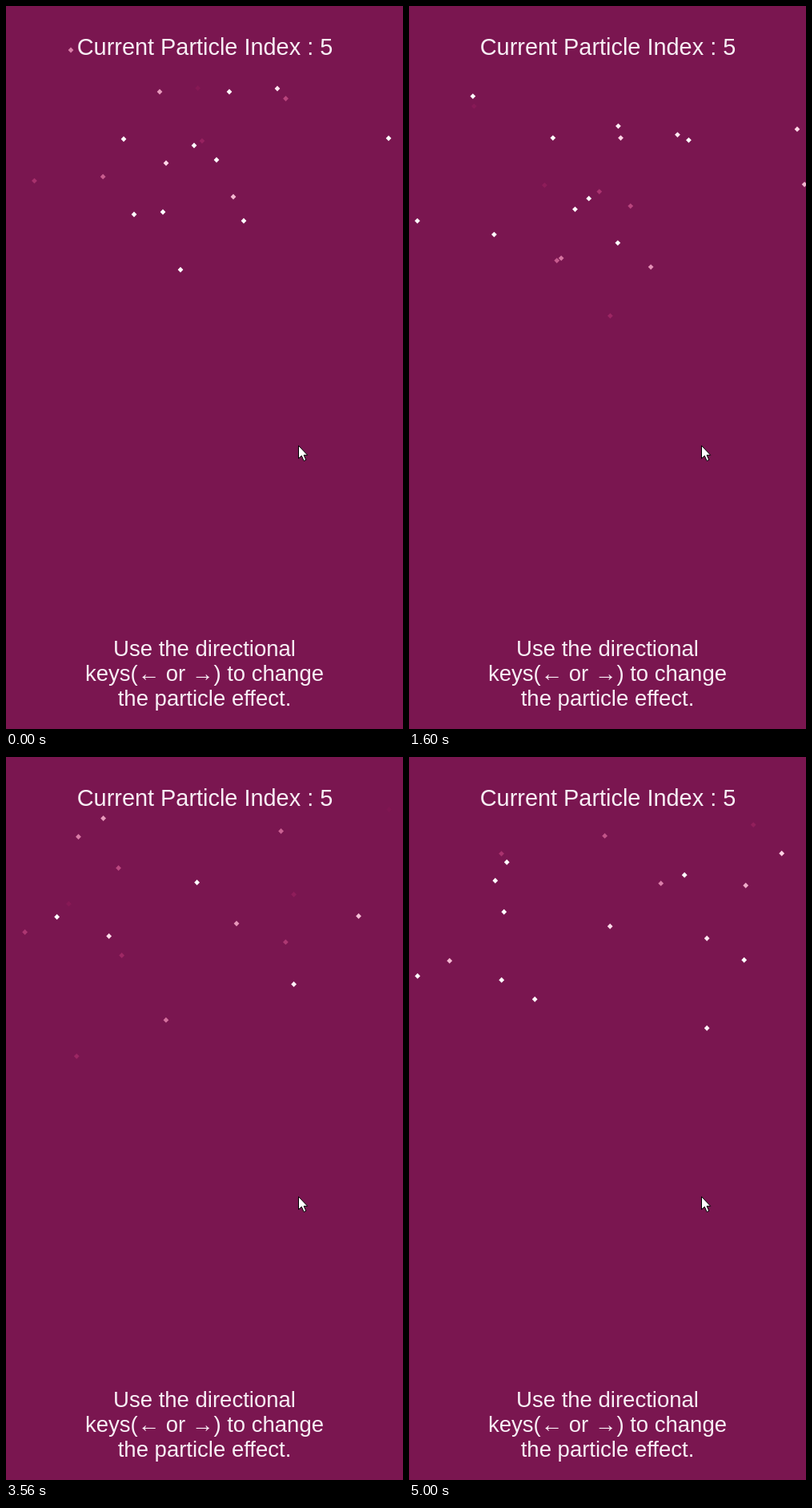
Recreate the animation shown at these times as an HTML page with a canvas. Size 496 px wide and 902 px high, loop 5040 ms.

```html
<!DOCTYPE html>
<html lang="en">
<head>
<meta charset="utf-8">
<title>Particle effect</title>
<style>
  html, body { margin: 0; width: 100%; height: 100%; overflow: hidden; background: #7a1650; }
  canvas, svg { position: absolute; left: 0; top: 0; display: block; }
  text { font-family: "Liberation Sans", Arial, sans-serif; fill: #f8eef5; text-anchor: middle; }
  .title { font-size: 28.9px; }
  .hint { font-size: 27.5px; }
  .arrow { font-family: "Liberation Serif", serif; }
</style>
</head>
<body>
<canvas id="sky" width="496" height="902"></canvas>
<svg width="496" height="902" viewBox="0 0 496 902">
  <text class="title" x="248.5" y="61">Current Particle Index : 5</text>
  <g class="hint">
    <text x="248" y="811">Use the directional</text>
    <text x="248" y="842">keys(<tspan class="arrow">←</tspan> or <tspan class="arrow">→</tspan>) to change</text>
    <text x="248" y="873">the particle effect.</text>
  </g>
  <path transform="translate(365.5 548.5)" fill="#fff" stroke="#000" stroke-linejoin="round"
    d="M0 0V16L3.8 12.6L6.6 19L9.3 17.8L6.6 11.8H11.2Z"/>
</svg>
<script>
const LOOP = 5040, STEP = 40;
const LIFE = 4.8, FADE_IN = 1.9, FADE_OUT = 1.7, RADIUS = 3.4;

const ctx = document.getElementById("sky").getContext("2d");
const wave = (i, period) => Math.sin(2 * Math.PI * i / period);

function seeded(seed) {
  return (lo, hi) => {
    seed = (seed * 1664525 + 1013904223) % 4294967296;
    return lo + (hi - lo) * seed / 4294967296;
  };
}

// Particles born at an even rate; key points are their places at time `at`
function flock(points, at, firstBorn, rate, fall, drift) {
  return points.map(([x, y], i) => (
    { x, y, at, born: firstBorn + i * rate, vx: drift(i), vy: fall }
  ));
}

// Particles that appear at random places
function strays(count, firstBorn, rate, rand) {
  return Array.from({ length: count }, (_, i) => {
    const born = firstBorn + i * rate;
    return {
      x: rand(20, 480), y: rand(15, 230), at: born, born,
      vx: rand(-18, 18), vy: rand(28, 48)
    };
  });
}

const opening = [
  [147, 166], [218, 329], [235, 174], [263, 192], [160, 260], [196, 257], [297, 268],
  [478, 165], [279, 107], [339, 103], [200, 196], [284, 238], [192, 107], [81, 55]
];
const closing = [
  [55, 236], [247, 193], [368, 320], [120, 260], [426, 235], [122, 113], [102, 136],
  [344, 129], [126, 175], [15, 255], [153, 284], [368, 208], [470, 102], [428, 142]
];

const rand = seeded(5);
const particles = [
  ...flock(opening, 0, -3, 0.146, 36, i => 14 - 1.8 * i + 10 * wave(i, 3)),
  ...strays(6, -0.9, 0.19, rand),
  ...flock(closing, 4.52, 1.45, 0.17, 38, i => 14 * wave(i - 0.375, 4.5) - 2),
  ...strays(4, 3.9, 0.28, rand)
];

function diamond(x, y, glow) {
  const g = Math.round(45 + 210 * glow);
  const b = Math.round(102 + 0.6 * g);
  ctx.globalAlpha = Math.min(1, 1.25 * glow);
  ctx.fillStyle = `rgb(255, ${g}, ${b})`;
  ctx.beginPath();
  ctx.moveTo(x, y - RADIUS);
  ctx.lineTo(x + RADIUS, y);
  ctx.lineTo(x, y + RADIUS);
  ctx.lineTo(x - RADIUS, y);
  ctx.fill();
}

function draw(t) {
  ctx.clearRect(0, 0, 496, 902);
  for (const { x, y, at, born, vx, vy } of particles) {
    const age = t - born;
    const glow = Math.min(1, age / FADE_IN, (LIFE - age) / FADE_OUT);
    if (glow > 0) diamond(x + vx * (t - at), y + vy * (t - at), glow);
  }
}

let start;
function tick(now) {
  start ??= now;
  const ms = Math.max(0, now - start) % LOOP;
  draw(Math.floor(ms / STEP) * STEP / 1000);
  requestAnimationFrame(tick);
}
draw(0);
requestAnimationFrame(tick);
</script>
</body>
</html>
```
